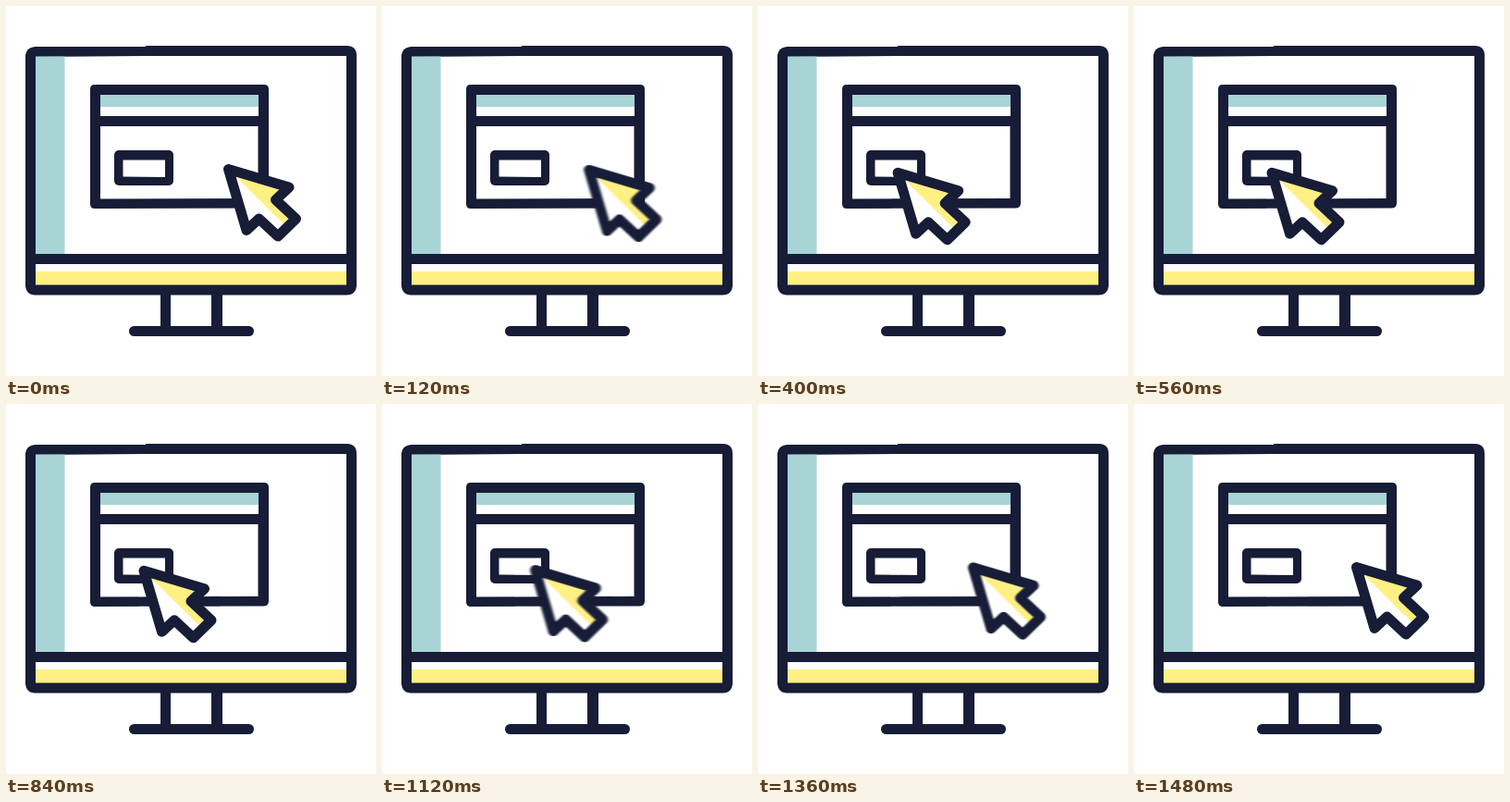
Write an HTML page that moves like this. It is 400 px wide and 400 px high and loops after 2.2 s.

```html
<!DOCTYPE html>
<html lang="en">
<head>
<meta charset="utf-8">
<title>Desktop click</title>
<style>
  html, body { margin: 0; width: 100%; height: 100%; overflow: hidden; background: #fff; }
  svg { display: block; width: 100%; height: 100%; }
  .ink { fill: #171c37; }
  .teal { fill: #a8d4d5; }
  .yellow { fill: #fff084; }
  .white { fill: #fff; }
</style>
</head>
<body>
<svg viewBox="0 0 400 400">
  <defs>
    <filter id="motion" filterUnits="userSpaceOnUse" x="215" y="150" width="130" height="125" color-interpolation-filters="sRGB">
      <feGaussianBlur id="blur" stdDeviation="0 0"/>
    </filter>
  </defs>

  <!-- stand -->
  <path class="ink" d="M167 308h11v42h-11zM222 308h12v42h-12z"/>
  <rect class="ink" x="133" y="346" width="135" height="11" rx="5.5"/>

  <!-- monitor -->
  <path class="ink" d="M31 44H151V43H370Q379 44 379 53V303Q378 312 369 312.5H31Q22 312 21 303V53Q22 45 31 44Z"/>
  <path class="white" d="M32 55L151 54H368V268H32z"/>
  <rect class="teal" x="32" y="54.5" width="31.5" height="213.5"/>
  <rect class="white" x="32" y="279" width="336" height="8"/>
  <rect class="yellow" x="32" y="287" width="336" height="14.5"/>

  <!-- window -->
  <path class="ink" d="M96 85H279Q284 85 284 90V213Q284 218 279 218.5L96 219Q91 219 91 214V90Q91 85 96 85Z"/>
  <rect class="teal" x="102" y="96" width="171" height="13.5"/>
  <rect class="white" x="102" y="109" width="171" height="10"/>
  <path class="white" d="M102 130H272.5V208L102 208.5z"/>
  <rect class="ink" x="117" y="156" width="64" height="38" rx="5"/>
  <path class="white" d="M126.500 166.500H172V185L126.500 184.500z"/>

  <g id="cursor">
    <g filter="url(#motion)">
      <path class="white" d="M240.500 176.500L306 196 291.500 209.500 313.500 230 294 249 273.500 230 260 242.500z"/>
      <path class="yellow" d="M240.500 176.500L306 196 291.500 209.500 313.500 230 304 239.500z"/>
      <path d="M240.500 176.500L306 196 291.500 209.500 313.500 230 294 249 273.500 230 260 242.500z"
        fill="none" stroke="#171c37" stroke-width="11" stroke-linejoin="round"/>
    </g>
  </g>
</svg>
<script>
  const LOOP = 2200, STEP = 40, MOVE = 440, BACK = 1000;
  const SHIFT = { x: -91.5, y: 3.8 };
  const cursor = document.getElementById('cursor');
  const blur = document.getElementById('blur');

  const clamp = v => Math.min(1, Math.max(0, v));
  const ease = p => p * p * (3 - 2 * p);
  const speed = p => 4 * p * (1 - p);

  function draw(time) {
    const t = Math.floor((time % LOOP) / STEP) * STEP;
    const out = clamp(t / MOVE);
    const back = clamp((t - BACK) / MOVE);
    const k = ease(out) - ease(back);
    const v = Math.max(speed(out), speed(back));
    cursor.setAttribute('transform', `translate(${SHIFT.x * k} ${SHIFT.y * k})`);
    // horizontal smear that follows the speed
    blur.setAttribute('stdDeviation', v > 0.35 ? `${1.9 * v} ${0.35 * v}` : '0 0');
  }

  const start = performance.now();
  function tick() {
    draw(performance.now() - start);
    requestAnimationFrame(tick);
  }
  tick();
</script>
</body>
</html>
```
